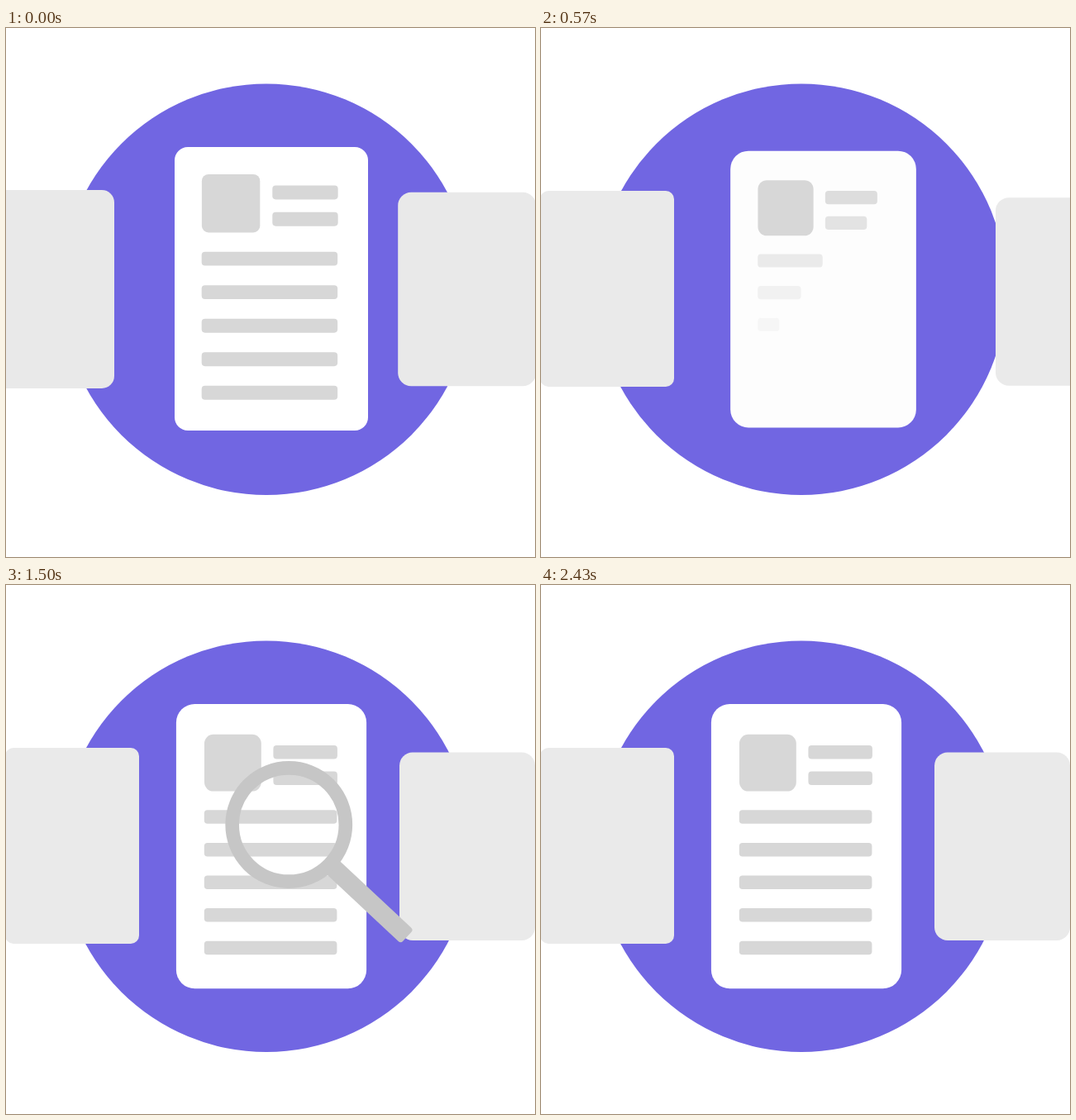
Recreate the animation shown at these times as an HTML page. Size 640 px wide and 640 px high, loop 2870 ms.

```html
<!DOCTYPE html>
<html lang="en">
<head>
<meta charset="utf-8">
<title>Document review</title>
<style>
  html, body { margin: 0; width: 100%; height: 100%; overflow: hidden; background: #fff; }
  svg { display: block; width: 100vw; height: 100vh; }
</style>
</head>
<body>
<svg id="stage" viewBox="0 0 640 640">
  <ellipse cx="315" cy="316.2" rx="248.4" ry="248.8" fill="#7166e2"/>
</svg>
<script>
const LOOP = 2870, FPS = 14, LAST = 34, LINE_COUNT = 7;
const stage = document.getElementById('stage');

function set(el, attrs) {
  for (const key in attrs) el.setAttribute(key, attrs[key]);
  return el;
}
function add(parent, name, attrs = {}) {
  const el = document.createElementNS('http://www.w3.org/2000/svg', name);
  parent.appendChild(el);
  return set(el, attrs);
}

const clamp = v => Math.max(0, Math.min(1, v));
const mix = (a, b, p) => a + (b - a) * p;
const smooth = u => { u = clamp(u); return u * u * (3 - 2 * u); };
const easeOut = u => 1 - (1 - clamp(u)) ** 2;

// Carousel slots, given by centre, size, corner radius and grey level.
const slots = {
  exit: { x: 47.5, y: 316, w: 167, h: 240, r: 15, grey: 233 },
  left: { x: 80, y: 315.5, w: 162, h: 237, r: 10, grey: 234 },
  start: { x: 321, y: 315.5, w: 234, h: 343, r: 16, grey: 255 },
  centre: { x: 321, y: 316.1, w: 230.2, h: 344.3, r: 22.5, grey: 255 },
  next: { x: 557.7, y: 316, w: 167, h: 234.5, r: 16, grey: 233 },
  right: { x: 558, y: 316.2, w: 164, h: 227.5, r: 16, grey: 234 }
};

function between(a, b, move, size = move) {
  const pose = {};
  for (const key in a) pose[key] = mix(a[key], b[key], 'wh'.includes(key) ? size : move);
  return pose;
}

function drawCard(el, { x, y, w, h, r, grey }) {
  const level = Math.min(255, Math.round(grey));
  set(el, {
    x: x - w / 2, y: y - h / 2, width: w, height: h, rx: r,
    fill: `rgb(${level},${level},${level})`
  });
}

// Two short lines beside the avatar, then evenly spaced long ones.
function lineBox(i) {
  return i < 2
    ? { x: 3.4, y: -126.5 + 31.5 * i, width: 77.5 }
    : { x: -80.2, y: -48.3 + 39.6 * (i - 2), width: 160.6 };
}

function makeText() {
  const group = add(stage, 'g', { fill: '#d7d7d7' });
  return {
    group,
    avatar: add(group, 'rect'),
    lines: Array.from({ length: LINE_COUNT }, (_, i) =>
      add(group, 'rect', { ...lineBox(i), height: 16.5, rx: 4 }))
  };
}

function drawText(text, x, y, scale, opacity, avatar, shown = () => 1) {
  set(text.group, { transform: `translate(${x} ${y}) scale(${scale})`, opacity });
  const size = 68.8 * avatar.scale;
  set(text.avatar, {
    x: -45.6 - size / 2, y: -105.4 - size / 2, width: size, height: size,
    rx: avatar.radius, opacity: shown(0)
  });
  text.lines.forEach((line, i) => {
    const part = shown(i + 1);
    set(line, { width: lineBox(i).width * part, opacity: part });
  });
}

const exitCard = add(stage, 'rect');
const firstCard = add(stage, 'rect');
const firstText = makeText();
const secondCard = add(stage, 'rect');
const secondText = makeText();
const rightCard = add(stage, 'rect');

const glass = add(stage, 'g');
add(glass, 'rect', {
  x: 70, y: -9.8, width: 127, height: 22.6, rx: 4, fill: '#c6c6c6', transform: 'rotate(43)'
});
add(glass, 'circle', { r: 68.6, fill: 'none', stroke: '#c6c6c6', 'stroke-width': 16.6 });

const glassStart = { x: 743, y: 650 };
const glassMoves = [
  { from: 10, to: 16, x: 330, y: 206 },
  { from: 16, to: 18, x: 280, y: 215 },
  { from: 19, to: 23, x: 363, y: 315 },
  { from: 24, to: 27.75, x: 284, y: 414 },
  { from: 27.75, to: 30, x: 366, y: 417 },
  { from: 31, to: 34, x: 750, y: 780, ease: smooth }
];

function glassAt(n) {
  return glassMoves.reduce((at, { from, to, x, y, ease = easeOut }) => {
    const p = ease((n - from) / (to - from));
    return { x: mix(at.x, x, p), y: mix(at.y, y, p) };
  }, glassStart);
}

function drawFirst(n) {
  const move = smooth((n / 8) ** 1.06), size = move ** 1.3;
  drawCard(firstCard, between(slots.start, slots.left, move, size));
  drawText(firstText, mix(318.8, 68, move), 320.1, mix(1.024, 0.771, size),
    clamp((8 - n) / 4), { scale: 1, radius: 8 });
}

function drawSecond(n) {
  // Slides in, goes a little too far and settles.
  const move = smooth((n / 9.9) ** 1.077) * mix(1.025, 1, smooth((n - 11) / 5));
  const pose = between(slots.next, slots.centre, move);
  const scale = pose.w / slots.centre.w;
  const bounce = 1 - 0.038 * Math.sin(Math.PI * clamp((n - 8) / 8));
  drawCard(secondCard, pose);
  drawText(secondText, pose.x - scale, 320.6, scale, 1, { scale: bounce, radius: 11 },
    i => clamp(1 - i / 6 + 0.28 * (n - 8)));
}

function draw(time) {
  const n = Math.min(LAST, Math.floor((time % LOOP + 5) * FPS / 1000));
  drawCard(exitCard, { ...slots.exit, x: mix(slots.exit.x, -117, smooth(n / 4)) });
  drawFirst(n);
  drawSecond(n);
  const { right } = slots, arrival = smooth((n - 4) / 7);
  drawCard(rightCard, { ...right, x: mix(746, right.x, arrival), y: mix(323, right.y, arrival) });
  const { x, y } = glassAt(n);
  set(glass, { transform: `translate(${x} ${y})` });
}

function tick() {
  draw(performance.now());
  requestAnimationFrame(tick);
}
tick();
</script>
</body>
</html>
```
